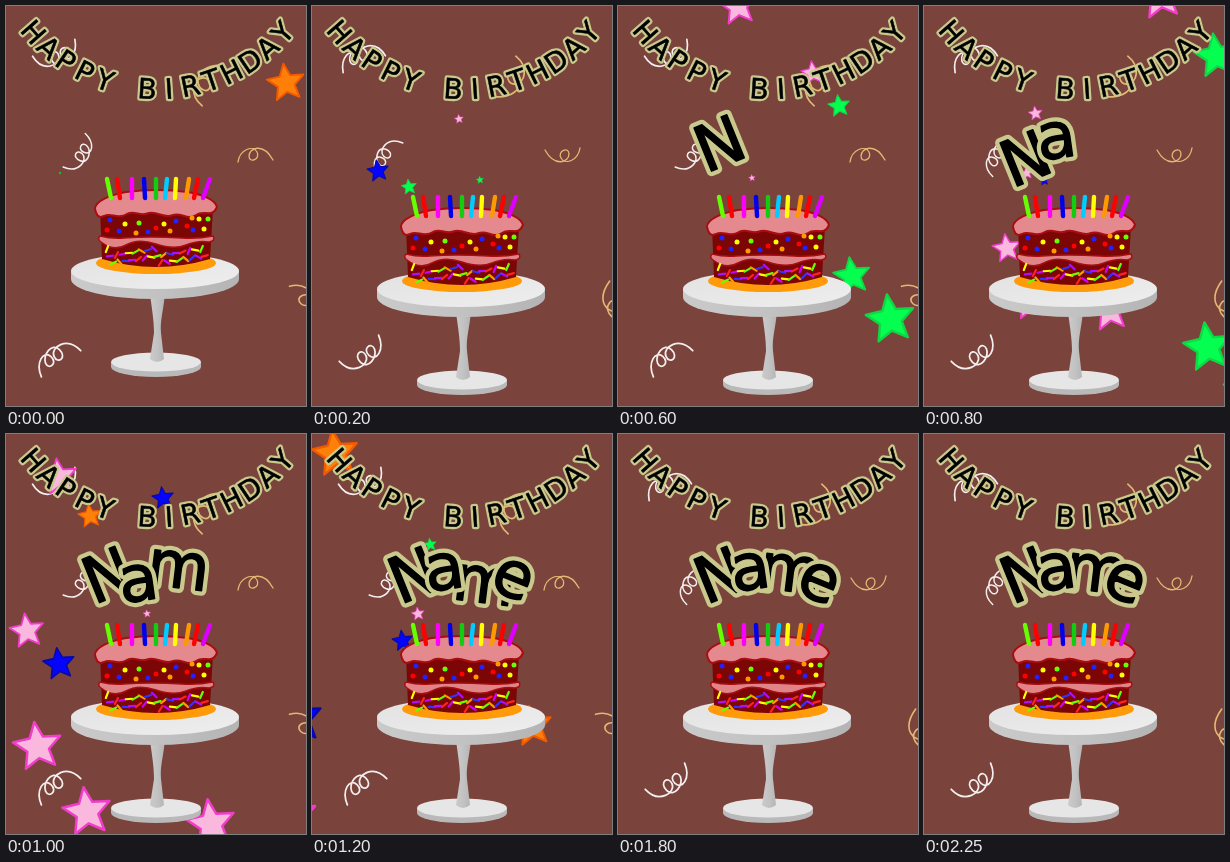
An HTML page that plays this animation: 300 by 400 pixels, repeating every 2450 ms.

```html
<!DOCTYPE html>
<html lang="en">
<head>
<meta charset="utf-8">
<title>Happy Birthday</title>
<style>
  html, body { margin: 0; width: 100%; height: 100%; overflow: hidden; background: #7a433b; }
  svg { display: block; width: 300px; height: 400px; }
  text { font-family: "DejaVu Sans", sans-serif; text-anchor: middle; stroke-linejoin: round; }
  .slab { font-family: "DejaVu Sans Mono", monospace; }
  .edge { fill: #c9c98d; stroke: #c9c98d; }
  .ink { fill: #000; stroke: #000; }
  #banner { font-size: 28px; }
  #banner .edge { stroke-width: 5px; }
  #banner .ink { stroke-width: .5px; }
  #name { font-size: 64px; }
  #name .edge { stroke-width: 10px; }
  #name .ink { stroke-width: 1.5px; }
  #curls path { fill: none; stroke-width: 1.3; stroke-linecap: round; }
  #stars polygon { stroke-width: .1; stroke-linejoin: round; }
  #candles { stroke-width: 4.4; stroke-linecap: round; }
  #sprinkles { stroke-width: 2.2; stroke-linecap: round; }
</style>
</head>
<body>
<svg viewBox="0 0 300 400">
  <defs>
    <linearGradient id="metal">
      <stop offset="0" stop-color="#cacaca"/>
      <stop offset=".5" stop-color="#c2c2c2"/>
      <stop offset="1" stop-color="#b4b4b4"/>
    </linearGradient>
    <linearGradient id="plate" x2="1" y2="1">
      <stop offset="0" stop-color="#e2e2e2"/>
      <stop offset="1" stop-color="#eeeeee"/>
    </linearGradient>
  </defs>
  <rect width="300" height="400" fill="#7a433b"/>
  <g id="curls"></g>
  <g id="stars"></g>
  <g id="cake">
    <path d="M105 374v5a45 10 0 0 0 90 0v-5z" fill="#b9b9b9"/>
    <ellipse cx="150" cy="374" rx="45" ry="9.5" fill="#e6e6e6"/>
    <path d="M144 306H159C157 325 154 332 155 345L158 371Q151 377 144 371L148 345C148 332 146 322 144 306Z" fill="url(#metal)"/>
    <path d="M65 283v8a84 20 0 0 0 168 0v-8z" fill="url(#metal)"/>
    <ellipse cx="149" cy="283" rx="84" ry="18" fill="url(#plate)"/>
    <ellipse cx="150" cy="275" rx="60" ry="11" fill="#ff9a0a"/>
    <path d="M94 220L96 271Q150 287 204 271L207 220Z" fill="#7c0505"/>
    <path d="M94 248Q106 251 118 250T145 249T176 250T207 248Q210 253 203 254Q192 252 180 257T150 256T120 257T95 254Q91 251 94 248Z" fill="#e18488" stroke="#a80d12" stroke-width="1.5"/>
    <path d="M89 221C89 213 104 207 120 204Q150 200 182 204C198 207 209 212 211 219C206 231 198 221 190 227C181 233 176 224 167 227C158 231 152 223 143 225C134 229 129 222 121 226C112 232 105 224 98 228C92 231 90 226 89 221Z" fill="#e48a8e" stroke="#a80d12" stroke-width="2"/>
    <g id="dots"></g>
    <g id="sprinkles"></g>
    <g id="candles"></g>
  </g>
  <g id="banner"></g>
  <g id="name"></g>
</svg>
<script>
const LOOP = 2450, STEP = 50, SPEED = 0.435;
const $ = id => document.getElementById(id);

function add(parent, tag, attrs, text) {
  const el = document.createElementNS("http://www.w3.org/2000/svg", tag);
  for (const k in attrs) el.setAttribute(k, attrs[k]);
  if (text) el.textContent = text;
  parent.append(el);
  return el;
}

// A black letter on a wide pale edge
function letter(parent, ch, y = 0) {
  const g = add($(parent), "g", ch === "I" ? { class: "slab" } : {});
  add(g, "text", { class: "edge", y }, ch);
  add(g, "text", { class: "ink", y }, ch);
  return g;
}

const place = (el, x, y, angle, k = 1) =>
  el.setAttribute("transform", `translate(${x} ${y}) rotate(${angle}) scale(${k})`);
const show = (el, on) => el.setAttribute("visibility", on ? "visible" : "hidden");

// Banner letters on a hanging arc
[..."HAPPY BIRTHDAY"].forEach((ch, i) => {
  if (ch !== " ") place(letter("banner", ch, 175), 152, -82, 49 - i * 7.54);
});

// Candles: colour, top x, foot x
[["#6f0", 101, 105], ["#f00", 111, 114], ["#f0f", 126, 126], ["#00e", 138, 139],
 ["#1c1", 150, 150], ["#0cf", 161, 159], ["#ff0", 170, 169], ["#f90", 183, 180],
 ["#f00", 192, 188], ["#d0f", 204, 197]].forEach(([stroke, x1, x2]) =>
  add($("candles"), "line", { stroke, x1, x2, y1: 191, y2: 210 }));

const sweets = ["#22f", "#ff0", "#f00", "#6f0", "#f90"];
[[104, 232, 0], [119, 236, 1], [101, 242, 2], [133, 235, 3], [113, 243, 0], [130, 245, 4],
 [142, 244, 0], [150, 240, 2], [158, 236, 1], [164, 243, 4], [170, 233, 0], [181, 238, 2],
 [186, 230, 4], [187, 242, 0], [193, 231, 1], [202, 231, 3], [198, 241, 1]].forEach(([cx, cy, c]) =>
  add($("dots"), "circle", { cx, cy, r: 2.5, fill: sweets[c] }));

let seed = 11;
const rand = () => (seed = seed * 16807 % 2147483647) / 2147483647;
const jimmies = ["#ff0", "#a1f", "#6f0", "#f22", "#f90", "#c0f", "#33f"];
for (let i = 0; i < 32; i++) {
  const x = 101 + i * 3.15, y = 261 + i * 7 % 15;
  const a = (rand() - 0.5) * 2.4, dx = 3.3 * Math.cos(a), dy = 3.3 * Math.sin(a);
  add($("sprinkles"), "line", { x1: x - dx, y1: y - dy, x2: x + dx, y2: y + dy, stroke: jimmies[i % 7] });
}

// Streamers: x, y, angle, scale, kind
const COIL = { stroke: "#f4eeee", d: "M-18 7C-16-5-6-9-4-2S-11 6-10 0S2-11 4-3S-3 6-2-1S14-9 17 6" };
const LOOSE = { stroke: "#e3b873", d: "M-18 7C-16-6-3-10 1-3S-7 9-7 1S7-13 17 5" };
const curls = [[50, 50, 160, 1.3, COIL], [200, 75, -60, 1.3, LOOSE], [74, 149, 125, 1.15, COIL],
  [250, 149, 0, 1, LOOSE], [301, 297, 65, 1.25, LOOSE], [51, 350, -32, 1.35, COIL]
].map(([x, y, angle, k, kind]) => ({ x, y, angle, k, el: add($("curls"), "path", kind) }));
const flips = [200, 450, 750, 1000, 1250, 1500, 1750, 2000, 2250];

// Stars fly out of the middle: time, x and y of one point on the way, colour
const paint = { p: ["#fbb8de", "#f23ccb"], b: ["#0505fa", "#0808a8"], g: ["#05ff50", "#10d845"], o: ["#ff8008", "#f25a00"] };
const points = Array.from({ length: 10 }, (_, i) => {
  const r = i % 2 ? 0.46 : 1, a = i * Math.PI / 5;
  return `${(r * Math.sin(a)).toFixed(3)},${(-r * Math.cos(a)).toFixed(3)}`;
}).join(" ");
const stars = [
  [0, 280, 77, "o"],
  [200, 147, 113, "p"], [200, 97, 181, "g"], [200, 66, 165, "b"], [200, 168, 174, "g"],
  [600, 120, 0, "p"], [600, 195, 67, "p"], [600, 221, 100, "g"], [600, 234, 270, "g"], [600, 134, 172, "p"],
  [1000, 53, 43, "p"], [1000, 84, 82, "o"], [1000, 157, 64, "b"], [1000, 21, 197, "p"],
  [1000, 53, 230, "b"], [1000, 81, 378, "p"], [1000, 205, 390, "p"],
  [1450, 50, 26, "g"], [1450, 202, 70, "p"], [1450, 151, 95, "g"], [1450, 246, 142, "p"], [1450, 280, 142, "b"],
  [1450, 298, 130, "b"], [1450, 16, 241, "p"], [1450, 12, 282, "b"], [1450, 84, 367, "p"], [1450, 268, 390, "o"]
].map(([t, x, y, c]) => {
  const dx = x - 150, dy = y - 150, d = Math.hypot(dx, dy);
  const el = add($("stars"), "polygon", { points, fill: paint[c][0], stroke: paint[c][1] });
  return { el, ux: dx / d, uy: dy / d, born: t - d / SPEED };
});
const spark = add($("stars"), "circle", { cx: 54, cy: 167, r: 1.2, fill: "#0c2" });

// Name letters: resting baseline point, angle, start time
const letters = [["N", 110, 162, -22, 500], ["m", 170, 157, 7, 900],
  ["a", 135, 155, -8, 700], ["e", 194, 165, 22, 1100]
].map(([ch, x, y, angle, start]) => ({ x, y, angle, start, el: letter("name", ch) }));

// Each letter drops in, overshoots and settles
const bounce = age => age < 380 ? 14 * Math.sin(Math.PI * (age - 120) / 260) : 0;

function draw(t) {
  place($("cake"), 0, -18 * Math.max(0, 1 - t / 150), 0);

  const turn = flips.filter(f => f <= t).length % 2 * 180;
  curls.forEach(c => place(c.el, c.x, c.y, c.angle + turn, c.k));

  stars.forEach(s => {
    const d = (t - s.born) * SPEED, on = d > 1 && d < 330;
    show(s.el, on);
    if (on) place(s.el, 150 + s.ux * d, 150 + s.uy * d, -8, Math.min(25, 0.13 * d));
  });
  show(spark, t < STEP);

  letters.forEach(l => {
    show(l.el, t >= l.start);
    place(l.el, l.x, l.y + bounce(t - l.start), l.angle);
  });
}

const began = performance.now();
function tick() {
  const t = (performance.now() - began) % LOOP;
  draw(Math.floor(t / STEP) * STEP);
  requestAnimationFrame(tick);
}
tick();
</script>
</body>
</html>
```
